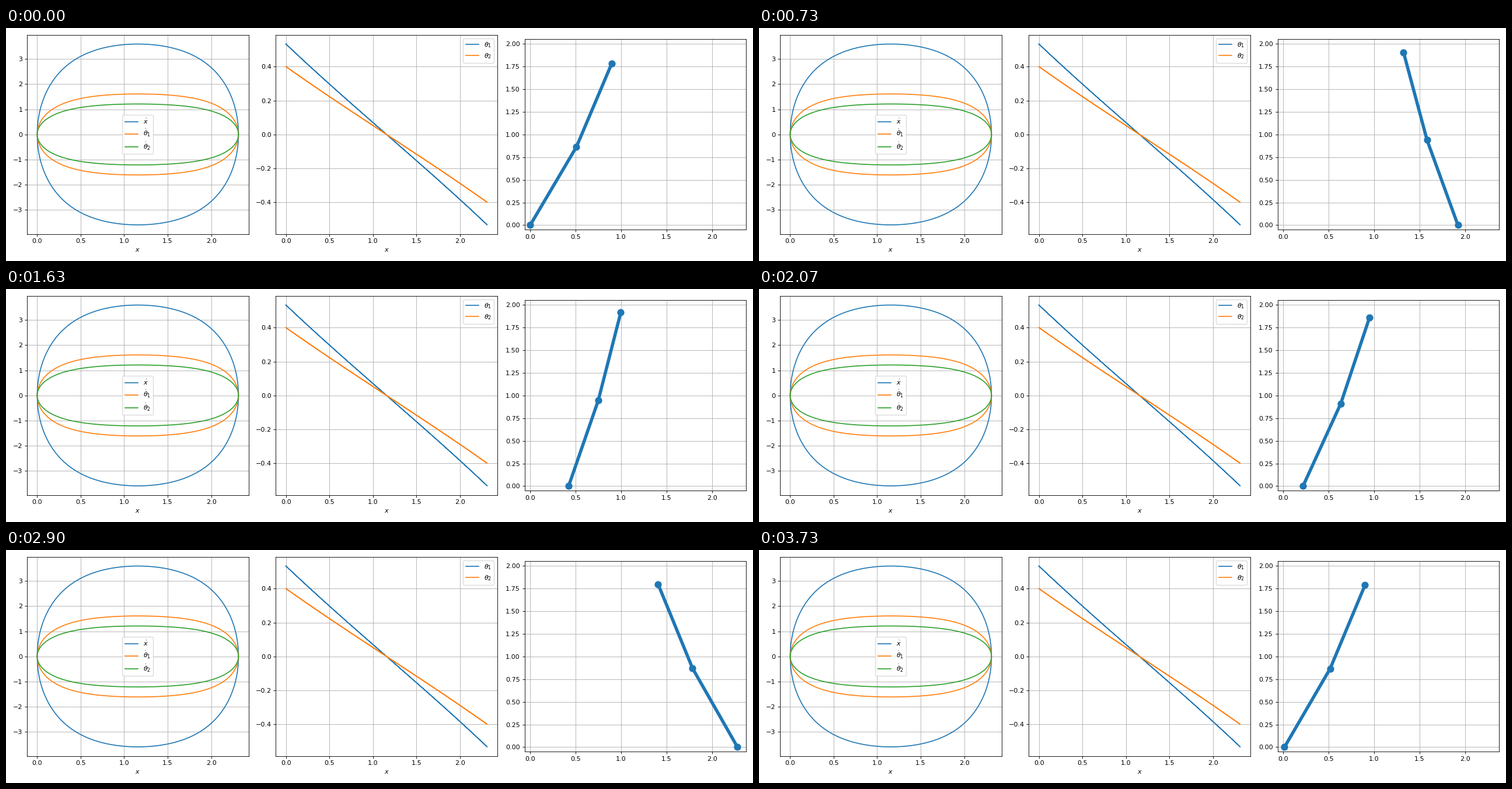
A matplotlib script for the animation above (3760 ms loop, 1280 px wide and 400 px high).

```python
import numpy as np
import matplotlib.pyplot as plt
from matplotlib.animation import FuncAnimation

FRAMES, LOOP_MS, FPS = 113, 3760, 30
AMP, V_MAX, STIFF = 1.157, 3.59, 0.3153


def phase_rate(phi):
    return V_MAX / AMP * np.sqrt(1 + STIFF * np.cos(phi) ** 2)


# Time as a function of phase, inverted by interpolation
phi_grid = np.linspace(0, 4.2 * np.pi, 6000)
inv_rate = 1 / phase_rate(phi_grid)
steps = np.diff(phi_grid) * (inv_rate[1:] + inv_rate[:-1]) / 2
t_grid = np.concatenate([[0], np.cumsum(steps)])


def cart(t):
    """Position and speed of the base."""
    phi = np.interp(t, t_grid, phi_grid)
    return AMP * (1 - np.cos(phi)), AMP * np.sin(phi) * phase_rate(phi)


def angle(x, lin, cub):
    """Link angle and its slope along the base path."""
    s = x - AMP
    return -lin * s - cub * s ** 3, -lin - 3 * cub * s ** 2


def link1(x):
    return angle(x, 0.448, 0.0095)


def link2(x):
    return angle(x, 0.337, 0.0065)


def pose(t):
    x, _ = cart(t)
    a, b = link1(x)[0], link2(x)[0]
    xs = np.cumsum([x, np.sin(a), np.sin(b)])
    ys = np.cumsum([0, np.cos(a), np.cos(b)])
    return xs, ys


fig, (ax_vel, ax_ang, ax_arm) = plt.subplots(1, 3, figsize=(16, 5), dpi=80)
fig.subplots_adjust(left=36.2 / 1280, right=1268 / 1280, top=0.97,
                    bottom=46.5 / 400, wspace=46.8 / 379.4)

x, v = cart(np.linspace(0, t_grid[-1] / 2.1, 1200))
(th1, slope1), (th2, slope2) = link1(x), link2(x)

ax_vel.plot(x, v, label=r'$\dot{x}$')
ax_vel.plot(x, slope1 * v, label=r'$\dot{\theta}_1$')
ax_vel.plot(x, slope2 * v, label=r'$\dot{\theta}_2$')
ax_vel.legend(loc='center')

ax_ang.plot(x, th1, label=r'$\theta_1$')
ax_ang.plot(x, th2, label=r'$\theta_2$')
ax_ang.legend(loc='upper right')

for ax in (ax_vel, ax_ang):
    ax.set_xlabel('$x$')
for ax in (ax_vel, ax_ang, ax_arm):
    ax.grid(True)

ax_arm.set_xlim(-0.0615, 2.375)
ax_arm.set_ylim(-0.05, 2.05)
ax_arm.set_xticks(np.arange(0, 2.1, 0.5))
ax_arm.set_yticks(np.arange(0, 2.1, 0.25))
ax_arm.set_aspect('equal')
arm, = ax_arm.plot(*pose(0), 'o-', lw=5, markersize=10)


def update(i):
    arm.set_data(*pose(i / FPS))
    return arm,


anim = FuncAnimation(fig, update, frames=FRAMES, interval=LOOP_MS / FRAMES,
                     repeat=True, repeat_delay=0)
plt.show()
```
